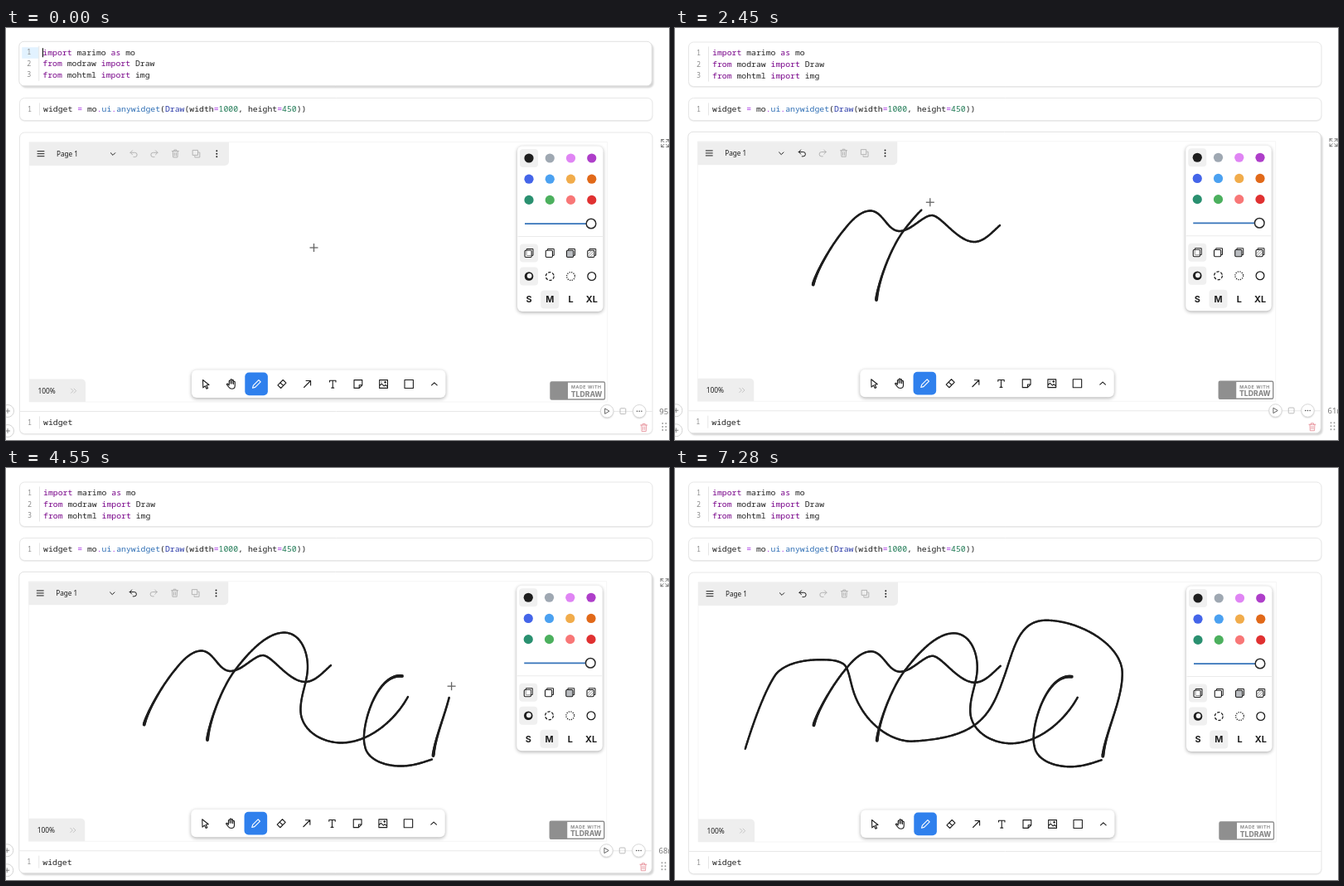
Write an HTML page with a canvas that moves like this. It is 800 px wide and 497 px high and loops after 7.35 s.

```html
<!DOCTYPE html>
<html lang="en">
<head>
<meta charset="utf-8">
<title>Notebook sketch</title>
<style>
  html, body { margin: 0; width: 100%; height: 100%; overflow: hidden; background: #fff; }
  canvas { display: block; width: 800px; height: 497px; }
</style>
</head>
<body>
<canvas id="stage"></canvas>
<script>
const W = 800, H = 497, LOOP = 7350, STEP = 70;
const LEAVE = 6440, BLUR = 7280;
const LEAD = 14;      // px the pointer runs ahead of the ink
const NUDGE = 0.75;   // a focused cell lifts up and left
const INK = '#1d1d1d', OFF = '#b4b4b4', GREY = '#8a8a8a';
const MONO = '"Noto Sans Mono", "DejaVu Sans Mono", monospace';
const SANS = '"Noto Sans", "Open Sans", sans-serif';
const UI = 'Inter, Roboto, sans-serif';

const canvas = document.getElementById('stage');
const ctx = canvas.getContext('2d');
const dpr = window.devicePixelRatio || 1;
canvas.width = W * dpr;
canvas.height = H * dpr;

const clamp = (v, lo, hi) => Math.max(lo, Math.min(hi, v));
const progress = (t, a, b) => clamp((t - a) / (b - a), 0, 1);

// ---------- pen strokes ----------
class Stroke {
  constructor(d, start, end, ms, pace = 1) {
    Object.assign(this, { start, end, ms, pace });
    this.path = document.createElementNS('http://www.w3.org/2000/svg', 'path');
    this.path.setAttribute('d', d);
    this.length = this.path.getTotalLength();
    this.dots = [];
    for (let l = 0; l < this.length; l += 2) this.dots.push(this.point(l));
  }
  point(l) { return this.path.getPointAtLength(clamp(l, 0, this.length)); }
  drawn(t) { return this.length * progress(t, this.start, this.end) ** this.pace; }
  pointer(t) { return this.point(this.drawn(t) + (t < this.start ? 0 : LEAD)); }
  draw(t) {
    if (t < this.start) return;
    const l = this.drawn(t);
    const shown = [...this.dots.slice(0, Math.floor(l / 2) + 1), this.point(l)];
    ctx.strokeStyle = INK;
    ctx.lineCap = 'round';
    for (let i = 1; i < shown.length; i++) {
      const a = shown[i - 1], b = shown[i];
      line(a.x, a.y, b.x, b.y, INK, 2.4 + 1.7 * Math.exp(-i / 10));
    }
    ctx.lineCap = 'butt';
  }
}

const strokes = [
  new Stroke('M166.7 309.5C170 295 188 262 206 241C217 227 227 220.5 236 220.5C251 221 256 245 271 245' +
    'C285 245 299 226 310 226C321 226 341 258 361 258C373 258 383 246 392 238', 820, 1740, 61, 1.4),
  new Stroke('M243 328C245 307 260 265 277 243C297 217 317 198.5 336 198.5C354 199 364 219 364 240' +
    'C364 258 355 274 355.5 293C356 315 379 331.5 405 331.5C438 331 469 305 485 276', 2150, 3240, 42),
  new Stroke('M478 251C446 247 427 316 433 335C435 350 454 359.5 476 359.5C492 359.5 503 355 514 351.5',
    3590, 4200, 68),
  new Stroke('M515.5 347C519 316 539 280 539 247C539 213 488 183 447 183C413 183 408 219 396 252' +
    'C380 298 366 325 284 329C255 328 226 303 215 270C210 255 209 241 203 236' +
    'C196 231 186 230.5 174 230.5C150 230.5 130 237 121 248C109 265 95 302 84 338', 4420, 5820, 54)
];
const PRESS = strokes[0].start;

// glide from the end of one stroke to the start of the next, then away
function pointer(t) {
  let pos = { x: 371.5, y: 265 }, free = 0;
  const glide = (to, a, b) => {
    const u = progress(t, a, b);
    pos = { x: pos.x + (to.x - pos.x) * u, y: pos.y + (to.y - pos.y) * u };
  };
  for (const s of strokes) {
    glide(s.point(0), free + 70, s.start - 100);
    if (t >= s.start) pos = s.pointer(t);
    free = s.end;
  }
  glide({ x: 322, y: 324 }, free + 130, LEAVE);
  return pos;
}

// ---------- drawing helpers ----------
function box(x, y, w, h, r, fill, stroke, lw = 1) {
  ctx.beginPath();
  ctx.roundRect(x, y, w, h, r);
  if (fill) { ctx.fillStyle = fill; ctx.fill(); }
  if (stroke) { ctx.strokeStyle = stroke; ctx.lineWidth = lw; ctx.stroke(); }
}

function raised(x, y, w, h, r, color, blur, dx, dy, border) {
  ctx.save();
  ctx.shadowColor = color;
  ctx.shadowBlur = blur * dpr;
  ctx.shadowOffsetX = dx * dpr;
  ctx.shadowOffsetY = dy * dpr;
  box(x, y, w, h, r, '#fff');
  ctx.restore();
  if (border) box(x, y, w, h, r, null, border);
}

function disc(x, y, r, fill, stroke, lw = 1.2, dash = []) {
  ctx.beginPath();
  ctx.arc(x, y, r, 0, Math.PI * 2);
  if (fill) { ctx.fillStyle = fill; ctx.fill(); }
  if (!stroke) return;
  ctx.setLineDash(dash);
  ctx.strokeStyle = stroke;
  ctx.lineWidth = lw;
  ctx.stroke();
  ctx.setLineDash([]);
}

function line(x1, y1, x2, y2, color, lw = 1) {
  ctx.strokeStyle = color;
  ctx.lineWidth = lw;
  ctx.beginPath();
  ctx.moveTo(x1, y1);
  ctx.lineTo(x2, y2);
  ctx.stroke();
}

function icon(d, x, y, color = INK, lw = 1) {
  ctx.save();
  ctx.translate(x, y);
  ctx.lineCap = ctx.lineJoin = 'round';
  ctx.strokeStyle = color;
  ctx.lineWidth = lw;
  ctx.stroke(new Path2D(d));
  ctx.restore();
}

function text(s, x, y, font, color, align = 'left', spacing = 0) {
  ctx.font = font;
  ctx.fillStyle = color;
  ctx.textAlign = align;
  ctx.letterSpacing = spacing + 'px';
  ctx.fillText(s, x, y);
  ctx.letterSpacing = '0px';
}

// ---------- code cells ----------
const TONE = { k: '#770088', o: '#a020e0', p: '#2f6fb5', f: '#2a3aa8', n: '#1f7a55', t: '#222' };
const imports = [
  'k:import |t:marimo |k:as |t:mo',
  'k:from |t:modraw |k:import |t:Draw',
  'k:from |t:mohtml |k:import |t:img'
];
const create = ['t:widget |o:= |t:mo|o:.|p:ui|o:.|p:anywidget|t:(|f:Draw|t:(width|o:=|n:1000|t:, height|o:=|n:450|t:))'];

function code(lines, y) {
  line(40.5, y - 11, 40.5, y + 4 + (lines.length - 1) * 13.6, '#e6e6e6');
  lines.forEach((src, i) => {
    const base = y + i * 13.6;
    text(i + 1, 28.5, base - 0.5, '8.4px ' + MONO, GREY, 'center');
    let x = 45;
    for (const part of src.split('|')) {
      const s = part.slice(2);
      text(s, x, base, '9.8px ' + MONO, TONE[part[0]]);
      x += ctx.measureText(s).width;
    }
  });
}

function cell(y, h, focused, body) {
  ctx.save();
  if (focused) ctx.translate(-NUDGE, -NUDGE);
  if (focused) raised(16.5, y, 763.5, h, 6, 'rgba(0,0,0,.17)', 2, 2.2, 2.4, '#e0e0e0');
  else raised(16.5, y, 763.5, h, 6, 'rgba(0,0,0,.13)', 1.5, 0, 1, '#e7e7e7');
  body();
  ctx.restore();
}

// ---------- drawing widget ----------
const TRASH = 'M-4-3H4M-1.5-3V-4.5H1.5V-3M-3-3L-2.6 4.5H2.6L3-3M-1-1V2.5M1-1V2.5';
const palette = ['#1d1d1d', '#9fa8b2', '#e085f4', '#ae3ec9', '#4465e9', '#4ba1f1',
  '#f1ac4b', '#e16919', '#2a9070', '#4cb05e', '#f87777', '#e03131'];
const column = i => 631 + 25.25 * i;

function menuBar(canUndo) {
  box(28, 138, 241, 28, [0, 0, 5, 0], '#eeeeee');
  icon('M-4-3H4M-4 0H4M-4 3H4', 42, 151.7);
  text('Page 1', 61, 154.8, '8.2px ' + SANS, INK);
  icon('M-2.7-1.3L0 1.4 2.7-1.3', 129, 152);
  const undo = 'M-1.5-4L-4-1.5-1.5 1M-4-1.5H1.5A2.6 2.6 0 0 1 1.5 3.8H0';
  const redo = 'M1.5-4L4-1.5 1.5 1M4-1.5H-1.5A2.6 2.6 0 0 0-1.5 3.8H0';
  icon(undo, 154, 151.8, canUndo ? INK : OFF);
  icon(redo, 179, 151.8, OFF);
  icon(TRASH, 204.3, 151.5, OFF);
  icon('M-4-4.3H2V1.7H-4ZM3-1.7H4.3V4.3H-1.7V3', 229.5, 151.7, OFF);
  for (const d of [-3.5, 0, 3.5]) disc(254.3, 151.7 + d, 0.95, INK);
}

function fillIcon(x, y, kind) {
  icon('M-2.8-3.4V-5H5V2.8H3.5', x, y);
  box(x - 5, y - 3.2, 8.2, 8.2, 1.2, kind === 2 ? '#b9bcc0' : '#fff', INK, 1.1);
  if (kind === 0) box(x - 3, y - 3.2, 6.2, 6.2, 0.8, null, '#777', 0.8);
  if (kind === 3) icon('M-4 1L-1-2M-4 4L2-2M-1 4L2 1', x, y, '#777', 0.8);
}

function stylePanel() {
  raised(617, 142.5, 103.5, 199.5, 6, 'rgba(0,0,0,.33)', 4, 0, 1.2);
  const rows = { color: 157, fill: 271.5, dash: 299.5, size: 327.5 };
  for (const [name, y] of Object.entries(rows))
    box(column(name === 'size' ? 1 : 0) - 11, y - 11, 22, 22, 4, '#f0f0f0');
  palette.forEach((color, i) => disc(column(i % 4), rows.color + 25.2 * (i >> 2), 5.6, color));

  line(626, 236.2, 700, 236.2, '#3573b9', 1.8);
  disc(706, 236, 5.8, '#fff', '#2b2b2b', 1.5);
  line(617.5, 251.5, 720, 251.5, '#ebebeb');

  for (let i = 0; i < 4; i++) fillIcon(column(i), rows.fill, i);
  disc(column(0), rows.dash, 5.3, INK);
  disc(column(0) + 0.6, rows.dash - 0.5, 2.9, '#f4f4f4');
  [[3.3, 1.8], [1.2, 1.37], []].forEach((dash, i) =>
    disc(column(i + 1), rows.dash, 4.9, null, INK, 1.3, dash));
  ['S', 'M', 'L', 'XL'].forEach((s, i) =>
    text(s, column(i), rows.size + 3.9, '700 10.8px ' + UI, INK, 'center'));
}

const tools = {
  select: 'M-3.5-5L4 1 .8 1.5 2.6 5 1 5.7-.8 2.3-3.2 4.4Z',
  hand: 'M-2.5 1.5V-3.6A.9.9 0 0 1-.8-3.6V-.5V-4.9A.9.9 0 0 1 1-4.9V-.5V-4A.9.9 0 0 1 2.8-4V0V-2.3' +
    'A.9.9 0 0 1 4.6-2.3V2C4.6 4.5 3 5.8 1 5.8S-2 5-3 3.5L-5.2.6C-5.4-.8-4-1-2.5 1.5',
  pen: 'M-4.8 4.8L-3.9 1.6 2.6-4.9 4.9-2.6-1.6 3.9Z',
  eraser: 'M-5 1.3L1.3-5 5-1.3-1.3 5ZM-2-1.7L1.7 2',
  arrow: 'M-4 4L4-4M-1.5-4H4V1.5',
  text: 'M-3.7-2.6V-4.3H3.7V-2.6M0-4.3V4.6M-1.5 4.6H1.5',
  note: 'M-4.9-4.9H4.9V1.3L1.3 4.9H-4.9ZM4.9 1.3H1.3V4.9',
  image: 'M-4.9-4.9H4.9V4.9H-4.9ZM-4.9 2L-2.3-.4.6 2.4 2.3 1 4.9 3.2M1-2.2H3M2-3.2V-1.2M-2.6-2.5H-2.4',
  shape: 'M-5.2-5H5.2V5H-5.2Z',
  more: 'M-3.3 1.4L0-1.7 3.3 1.4'
};

function toolbar() {
  raised(224, 412.5, 306.5, 33.5, 6, 'rgba(0,0,0,.33)', 4, 0, 1.2);
  box(288.3, 415.6, 27.6, 27.6, 5, '#2f80ed');
  Object.entries(tools).forEach(([name, d], i) =>
    icon(d, 241 + 30.65 * i, 429.5, name === 'pen' ? '#fff' : INK, 1.1));
}

function zoomBar() {
  box(28, 423.5, 68, 27.5, [0, 5, 0, 0], '#eeeeee');
  text('100%', 38.5, 440.7, '8.4px ' + SANS, INK);
  icon('M-3-2.6L-.4 0-3 2.6M.6-2.6L3.2 0 .6 2.6', 81.5, 437.7, '#c4c4c4');
}

function badge() {
  box(657, 427, 65.5, 21, 1.5, '#fff', '#8f8f8f', 1.4);
  box(657, 427, 21, 21, 0, '#8f8f8f');
  text('MADE WITH', 682, 435.3, '700 5.3px ' + UI, GREY, 'left', 0.55);
  text('TLDRAW', 681.8, 444.7, '800 8.6px ' + UI, GREY);
}

function expandIcon(x, y) {
  for (const sx of [-1, 1])
    for (const sy of [-1, 1]) {
      const [a, b, c, d] = [1.5 * sx, 4.5 * sy, 4.5 * sx, 1.5 * sy];
      icon(`M${a} ${b}H${c}V${d}M${c} ${b}L${1.3 * sx} ${1.3 * sy}`, x, y, '#666', 0.9);
    }
}

function hoverTools(t) {
  const ran = strokes.filter(s => t >= s.end + 40).pop();
  const busy = ran && t < ran.end + 120;
  for (const y of [462, 486]) {
    disc(2, y, 7.5, '#fff', '#d4d4d4', 1);
    icon('M-2.5 0H2.5M0-2.5V2.5', 2, y, '#777', 0.9);
  }
  expandIcon(795.3, 139);

  const button = x => raised(x - 7.8, 454.5, 15.5, 15.5, 8, 'rgba(0,0,0,.2)', 2, 0, 1, '#d8d8d8');
  if (!busy) button(725.3);
  icon('M-2-3L3 0-2 3Z', 725, 462.2, busy ? '#c8c8c8' : '#555', 0.9);
  box(741, 458.8, 6.8, 6.8, 1, null, busy ? '#888' : '#b5b5b5', 0.9);
  button(764.3);
  for (const d of [-2.7, 0, 2.7]) disc(764.2 + d, 462.2, 0.8, '#555');

  text((ran ? ran.ms : 95) + 'ms', 788.3, 465.5, '9.6px ' + SANS, '#777');
  icon(TRASH, 769.7, 482, busy ? '#bbb' : '#e58a94', 0.8);
  for (let i = 0; i < 6; i++) disc(792.3 + 4 * (i % 2), 477 + 4 * (i >> 1), 0.9, '#999');
}

function crosshair({ x, y }) {
  for (const [r, color, lw] of [[5.5, '#fff', 3], [5, '#666', 1.3]]) {
    line(x - r, y, x + r, y, color, lw);
    line(x, y - r, x, y + r, color, lw);
  }
}

function draw(t) {
  const first = t < PRESS, hover = t < LEAVE;
  ctx.setTransform(dpr, 0, 0, dpr, 0, 0);
  ctx.fillStyle = '#fff';
  ctx.fillRect(0, 0, W, H);

  cell(17, 53.5, first, () => {
    if (first) box(20, 24, 20.5, 13.5, 0, '#e2f2ff');
    code(imports, 33.4);
    if (first && t % 1200 < 600) line(45.2, 25, 45.2, 36, '#111', 1.1);
  });
  cell(84.5, 27, false, () => code(create, 101.4));
  cell(126, 363.5, !first && t < BLUR, () => {
    line(17, 462.5, 780, 462.5, '#e8e8e8');
    box(28, 137.5, 697.5, 313.5, 0, null, '#f5f5f5');
    ctx.save();
    ctx.translate(NUDGE, NUDGE);
    strokes.forEach(s => s.draw(t));
    ctx.restore();
    menuBar(!first);
    stylePanel();
    toolbar();
    zoomBar();
    badge();
    code(['t:widget'], 479.4);
    if (hover) hoverTools(t);
  });

  if (hover) crosshair(pointer(t));
}

function tick(now) {
  draw(Math.floor((now % LOOP) / STEP) * STEP);
  requestAnimationFrame(tick);
}
draw(0);
requestAnimationFrame(tick);
</script>
</body>
</html>
```
